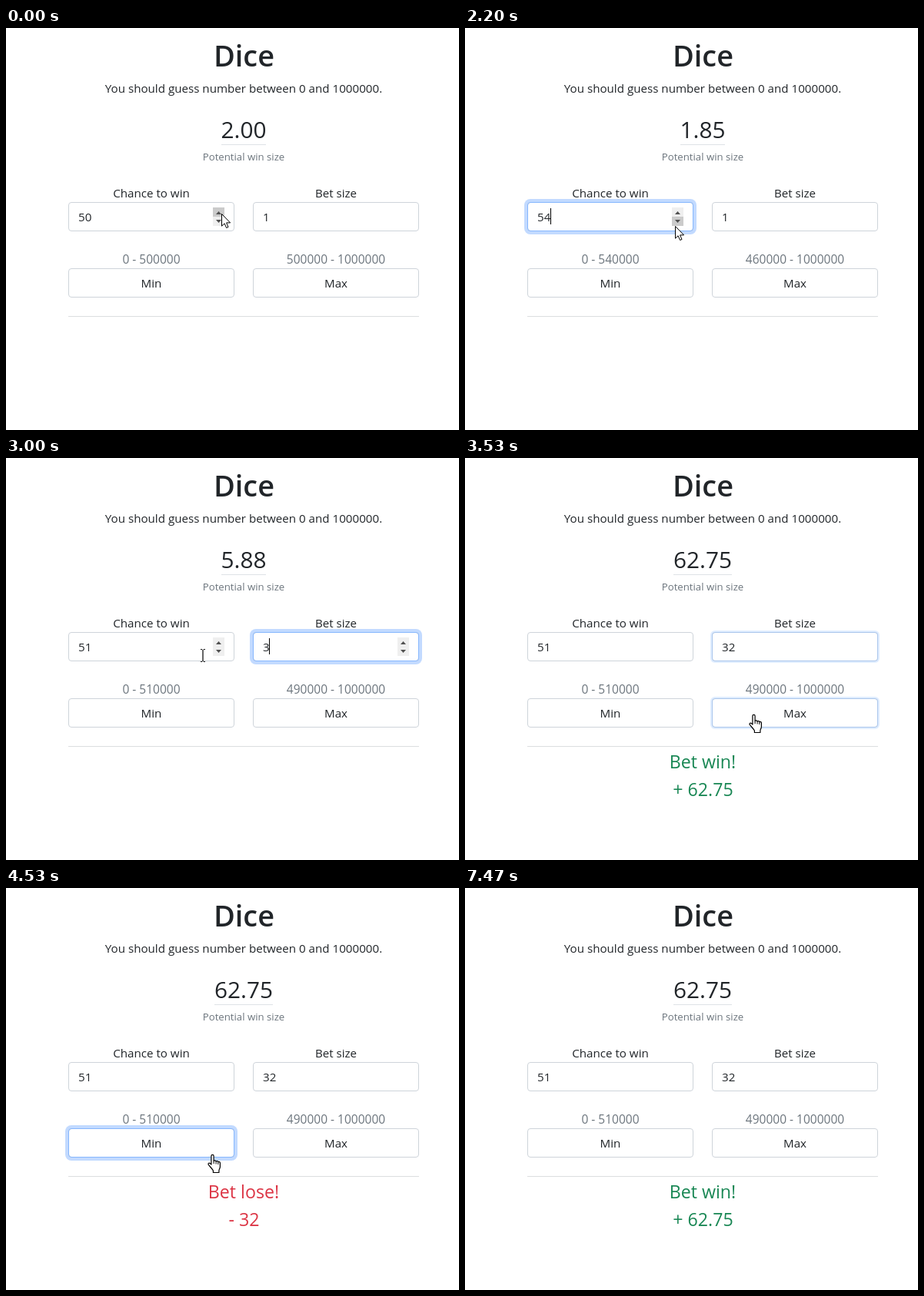
Recreate the animation shown at these times as an HTML page. Size 589x522 px, loop 8390 ms.

```html
<!DOCTYPE html>
<html lang="en">
<head>
<meta charset="utf-8">
<title>Dice</title>
<style>
html, body { margin: 0; width: 100%; height: 100%; overflow: hidden; background: #fff; }
svg { display: block; }
text { font-family: "Open Sans", "Noto Sans", sans-serif; font-size: 15.15px; fill: #212529; white-space: pre; }
.mid { text-anchor: middle; }
.muted { fill: #6c757d; }
</style>
</head>
<body>
<svg id="stage" width="589" height="522" viewBox="0 0 589 522"></svg>
<script>
const LOOP = 8390, TICK = 200 / 3;
const stage = document.getElementById('stage');

function set(node, attrs) {
  for (const key in attrs) node.setAttribute(key, attrs[key]);
  return node;
}
function el(tag, attrs, parent = stage) {
  return parent.appendChild(set(document.createElementNS('http://www.w3.org/2000/svg', tag), attrs));
}
function label(x, y, str, size = 15.15, cls = 'mid') {
  const node = el('text', { x, y, class: cls, style: `font-size:${size}px` });
  node.textContent = str;
  return node;
}
const show = (node, on) => set(node, { visibility: on ? 'visible' : 'hidden' });

// Timelines are counted in ticks of 1/15 s.
const chanceSteps = [[0, 50], [11, 51], [14, 52], [16, 53], [18, 54], [19, 55], [31, 54], [34, 53], [35, 52], [37, 51]];
const betSteps = [[0, 1], [43, 3], [48, 32]];
const resultSteps = [[0, ''], [51, 'win'], [68, 'lose'], [96, 'win']];
const pressed = new Set([11, 12, 14, 16, 18, 31, 32, 34, 37]);
const path = [
  [0, 280, 241], [22, 280, 241], [26, 273, 257], [37, 273, 257], [39, 345, 250], [43, 345, 250],
  [45, 256, 256], [47, 270, 285], [49, 340, 322], [51, 375.5, 334], [55, 375.5, 334],
  [59, 270.5, 347], [63, 268.5, 347], [96, 268.5, 347], [97, 244, 396], [98, 194, 494]
];

function stepValue(steps, k) {
  let value;
  for (const [at, v] of steps) if (k >= at) value = v;
  return value;
}
function cursorAt(k) {
  const i = path.findIndex(p => p[0] > k);
  if (i < 0) return path[path.length - 1].slice(1);
  const [a, ax, ay] = path[i - 1], [b, bx, by] = path[i], f = (k - a) / (b - a);
  return [ax + (bx - ax) * f, ay + (by - ay) * f];
}
function ease(f) {
  f = Math.min(1, Math.max(0, f));
  return f * f * (3 - 2 * f);
}

function makeBox(x, y, on, off) {
  const glow = el('rect', { fill: '#0d6efd' });
  const frame = { x: x + .5, y: y + .5, width: 215, height: 37, rx: 3.5 };
  el('rect', { ...frame, fill: '#fff', stroke: '#ced4da' });
  const focus = el('rect', { ...frame, fill: 'none', stroke: '#86b7fe' });
  return {
    x, y,
    has: (px, py) => px >= x && px < x + 216 && py >= y && py < y + 38,
    focused: k => k >= on && k < off,
    draw(k) {
      const f = ease((k - on) / 2) - ease((k - off) / 2), s = 4 * f;
      set(glow, { x: x - s, y: y - s, width: 216 + 2 * s, height: 38 + 2 * s, rx: 4 + s, opacity: .25 * f });
      set(focus, { opacity: f });
    }
  };
}

function makeSpinner(x) {
  const g = el('g', { transform: `translate(${x} 233)` });
  const halves = [[0, 'M4 9h7L7.5 5z'], [12, 'M4 16h7l-3.5 4z']].map(([y, d]) => ({
    back: el('rect', { y, width: 15, height: 12 }, g),
    arrow: el('path', { d }, g)
  }));
  return {
    draw(on, hot, down) {
      show(g, on);
      halves.forEach(({ back, arrow }, i) => {
        const act = hot === i;
        set(back, { fill: !act ? '#efefef' : down ? '#787878' : '#cbcbcb' });
        set(arrow, { fill: act && down ? '#fff' : '#505050' });
      });
    }
  };
}

function makeCursors() {
  const outline = { fill: '#fff', stroke: '#000', 'stroke-width': 1, 'stroke-linejoin': 'round' };
  const arrow = el('g', {});
  el('path', { ...outline, d: 'M.5.5V16.2L4.1 12.8 6.6 18.5 9 17.5 6.6 11.9H11.6Z' }, arrow);
  const beam = el('g', {});
  el('path', { d: 'M-3 -7.5H-.8M.8 -7.5H3M0 -7V8M-3 8.5H-.8M.8 8.5H3', fill: 'none', stroke: '#000', 'stroke-width': 1.2 }, beam);
  const hand = el('g', {});
  el('path', {
    ...outline, 'stroke-width': 1.2,
    d: 'M-1.6 1a1.6 1.6 0 0 1 3.2 0V7.5c.6-.9 2.6-.9 3 .4.8-.7 2.5-.4 2.7.8 1-.6 2.6-.1 2.6 1.4V15c0 2-1.5 3.5-1.5 5v2.5H.9V20C-.1 18-3.6 14.5-5.3 12.2-6.2 10.8-4.6 9.4-3.3 10.4L-1.6 12Z'
  }, hand);
  el('path', { d: 'M1.6 7.5V11M4.6 8V11.5M7.3 9V12', fill: 'none', stroke: '#000' }, hand);
  return { arrow, beam, hand };
}

label(309.5, 50, 'Dice', 38).style.fontWeight = 600;
label(309, 84, 'You should guess number between 0 and 1000000.');
const win = label(309, 143, '', 29.8);
const rule = el('rect', { y: 151, height: 1, fill: '#dee2e6' });
label(309, 172, 'Potential win size', 13.2, 'mid muted');

const chanceBox = makeBox(81, 226, 10, 39);
const betBox = makeBox(321, 226, 39, 52);
const minBox = makeBox(81, 312, 60, 110);
const maxBox = makeBox(321, 312, 52, 60);
const boxes = [chanceBox, betBox, minBox, maxBox];

label(189, 220, 'Chance to win');
label(429, 220, 'Bet size');
const chanceText = label(94, 251, '', 15.15, '');
const betText = label(334, 251, '', 15.15, '');
const lowRange = label(189, 306, '', 15.5, 'mid muted');
const highRange = label(429, 306, '', 15.5, 'mid muted');
label(189, 337, 'Min');
label(429, 337, 'Max');
el('rect', { x: 81, y: 374, width: 456, height: 1, fill: '#dcdee0' });
const outcome = label(309, 403, '', 23.2);
const amount = label(309.5, 439, '', 23.2);

const chanceSpin = makeSpinner(269), betSpin = makeSpinner(509);
const caret = el('rect', { y: 234, width: 1, height: 21, fill: '#000' });
const cursors = makeCursors();

function draw(t) {
  const k = Math.floor((t + 4) / TICK);
  const chance = stepValue(chanceSteps, k), bet = stepValue(betSteps, k);
  const [cx, cy] = cursorAt(k);

  const prize = (bet * 100 / chance).toFixed(2), wide = prize.length > 4 ? 76 : 58;
  win.textContent = prize;
  set(rule, { x: 309 - wide / 2, width: wide });
  chanceText.textContent = chance;
  betText.textContent = bet;
  lowRange.textContent = `0 - ${chance * 1e4}`;
  highRange.textContent = `${1e6 - chance * 1e4} - 1000000`;

  const result = stepValue(resultSteps, k), won = result === 'win';
  outcome.textContent = result && `Bet ${result}!`;
  amount.textContent = result && (won ? `+ ${prize}` : `- ${bet}`);
  outcome.style.fill = amount.style.fill = won ? '#198754' : '#dc3545';

  boxes.forEach(box => box.draw(k));
  const onSpin = cx >= 269 && cx < 285 && cy >= 233 && cy < 260;
  const hot = onSpin ? (cy < 245 ? 0 : 1) : -1;
  chanceSpin.draw(chanceBox.has(cx, cy) || chanceBox.focused(k), hot, pressed.has(k));
  betSpin.draw(betBox.has(cx, cy) || betBox.focused(k), -1, false);

  const inBet = betBox.focused(k);
  const blink = k >= 22 && k < 29;
  show(caret, inBet || (k >= 11 && chanceBox.focused(k) && !blink));
  set(caret, { x: inBet ? (bet > 9 ? 351 : 342) : 111 });

  const overInput = !onSpin && (chanceBox.has(cx, cy) || betBox.has(cx, cy));
  const overButton = minBox.has(cx, cy) || maxBox.has(cx, cy);
  const kind = overInput ? 'beam' : overButton ? 'hand' : 'arrow';
  for (const name in cursors) {
    show(cursors[name], name === kind && k < 99);
    set(cursors[name], { transform: `translate(${cx} ${cy})` });
  }
}

const start = performance.now();
function loop() {
  draw((performance.now() - start) % LOOP);
  requestAnimationFrame(loop);
}
loop();
</script>
</body>
</html>
```
